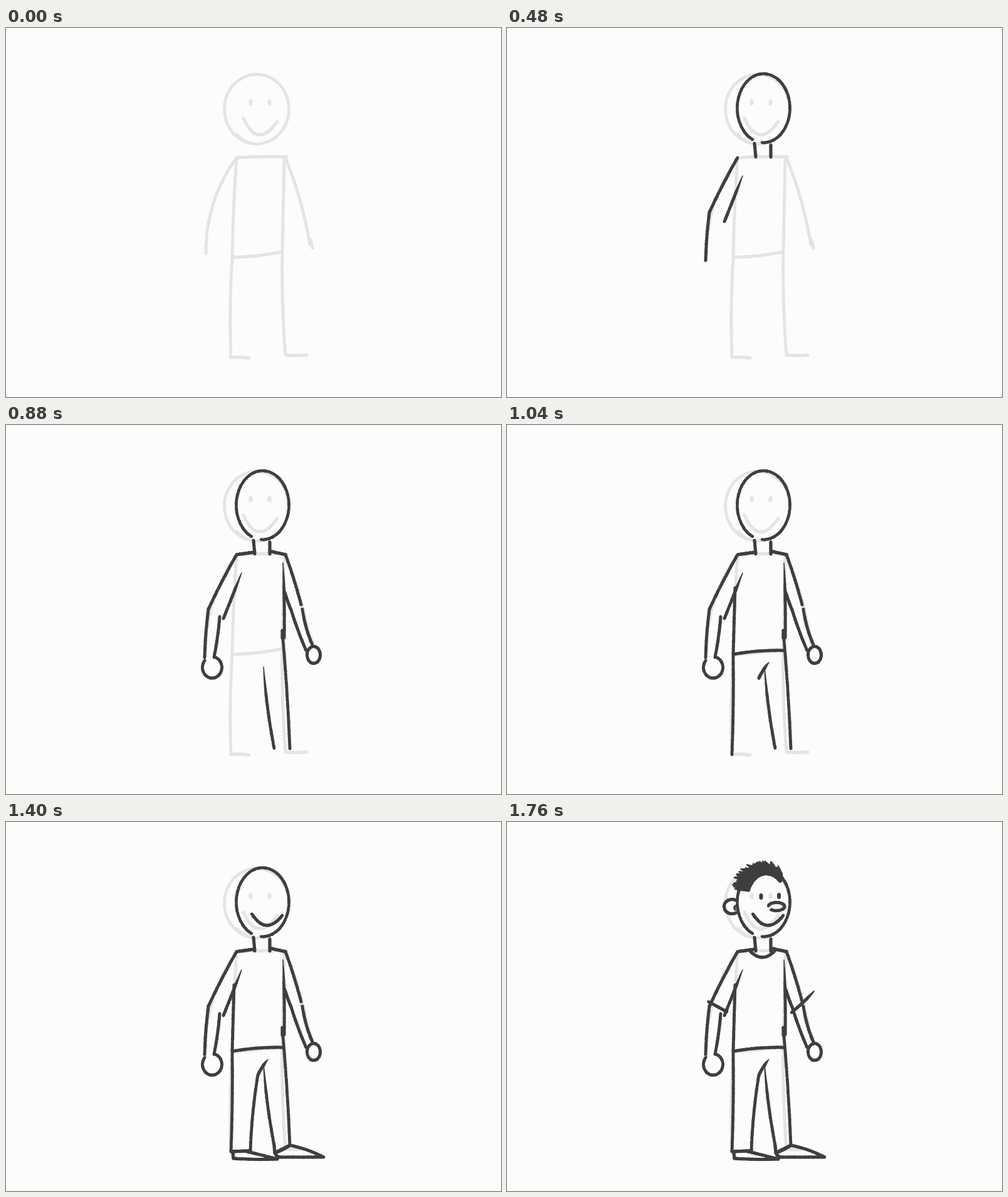
An HTML page with a canvas that plays this animation: 790 by 589 pixels, repeating every 2.76 s.

```html
<!DOCTYPE html>
<html lang="en">
<head>
<meta charset="utf-8">
<title>Sketching a figure</title>
<style>
html, body { margin: 0; width: 100%; height: 100%; overflow: hidden; background: #fcfcfc; }
canvas { display: block; }
</style>
</head>
<body>
<canvas id="stage" width="790" height="589"></canvas>
<script>
const ctx = document.getElementById('stage').getContext('2d');
const LOOP = 2760, START = 320, STEP = 40;
const PAPER = '#fcfcfc', PALE = '#e4e4e4', INK = '#3e3e3e';

let seed = 7;
const rnd = () => (seed = (seed * 16807) % 2147483647) / 2147483647;
const pt = (x, y) => ({ x, y });
const by = (p, dx, dy) => pt(p.x + dx, p.y + dy);
const mix = (a, b, u) => pt(a.x + (b.x - a.x) * u, a.y + (b.y - a.y) * u);

// A stroke has a path (u from 0 to 1 gives a point) and pen settings.
// A bow is a line from a to b that bulges sideways by `bulge` pixels.
function bow(a, b, bulge = 0, pen = {}) {
  const k = 2 * bulge / Math.hypot(b.x - a.x, b.y - a.y);
  const mid = by(mix(a, b, 0.5), (a.y - b.y) * k, (b.x - a.x) * k);
  return { at: u => mix(mix(a, mid, u), mix(mid, b, u), u), ...pen };
}

function onOval(c, rx, ry, degrees) {
  const t = degrees * Math.PI / 180;
  return by(c, rx * Math.cos(t), ry * Math.sin(t));
}

const oval = (c, rx, ry, from, to) => ({ at: u => onOval(c, rx, ry, from + (to - from) * u) });
const eye = (x, y) => bow(pt(x, y - 2), pt(x, y + 2), 0, { w: 5.6 });
const taper = { head: 0.3 };

const shoulderL = pt(368, 207), shoulderR = pt(446, 207);
const elbowL = pt(323, 294), elbowR = pt(455, 295);
const wristL = pt(317, 371), wristR = pt(489, 351);
const hipL = pt(361, 366), hipR = pt(441, 357);
const ankleL = pt(359, 526), ankleR = pt(446, 522);
const crotch = pt(402, 404), hem = pt(390, 525), hemR = pt(453, 516);
const toeL = pt(433, 538), toeR = pt(507, 535), heelL = pt(363, 537), heelR = pt(429, 528);

const guide = [
  oval(pt(400, 129.5), 51.5, 55.5, 100, 460),
  bow(pt(368, 170), pt(391, 184), 2),
  eye(390.5, 118.5), eye(420.5, 118.5),
  bow(pt(379, 144), pt(433, 149), 24),
  bow(shoulderL, by(shoulderR, 2, -1), -1),
  bow(shoulderL, hipL, 1), bow(by(shoulderR, -2, 0), hipR),
  bow(hipL, hipR, 2),
  bow(shoulderL, by(wristL, 2, -11), 13), bow(shoulderR, by(wristR, -4, -5), -4),
  bow(by(wristR, -3, -13), wristR),
  bow(hipL, ankleL, 2), bow(hipR, ankleR, 2),
  bow(ankleL, by(ankleL, 29, 1), -1), bow(ankleR, by(ankleR, 34, 0), 1)
];

// Each part lists its time steps in drawing order.
const headAndNeck = [
  [oval(pt(409.5, 128), 42, 55, 115, 453)],
  [bow(pt(395, 184), pt(397, 206)), bow(pt(421, 187), pt(421, 206))]
];

const arms = [
  [bow(shoulderL, elbowL, 1)],
  [bow(elbowL, wristL, 1)],
  [bow(pt(376, 236), pt(347, 309), 0, taper)],
  [bow(pt(341, 306), by(wristL, 15, 0), -1)],
  [oval(by(wristL, 12, 16), 15.5, 17, 222, -75)],
  [bow(shoulderL, pt(397, 203)), bow(pt(424, 202), shoulderR)],
  [bow(shoulderR, pt(471, 287), -1)],
  [bow(pt(473, 294), wristR, 2)],
  [bow(by(elbowR, -12, -37), elbowR, 1, taper), bow(elbowR, by(wristR, -10, 9), 1)],
  [oval(by(wristR, 2, 16), 10.5, 13.5, 260, -85)]
];

const bodyAndLegs = [
  [bow(pt(442, 220), pt(444, 340), -1, taper), bow(pt(441, 328), pt(441, 340))],
  [bow(by(hipR, 1, -15), hemR, -1)],
  [bow(pt(411, 386), by(heelR, -1, -12), 2, taper)],
  [bow(pt(364, 260), hipL)],
  [bow(hipL, by(hipR, 0, 3), -2)],
  [bow(hipL, ankleL, -1)],
  [bow(by(crotch, 16, -25), crotch, 1, taper)],
  [bow(crotch, hem, 2)],
  [bow(ankleL, hem)],
  [bow(by(heelR, -1, -12), heelR)],
  [bow(heelR, hemR, 1)]
];

const feet = [
  [bow(by(heelL, -1, -9), heelL), bow(heelL, toeL, 1)],
  [bow(by(hem, -5, 1), toeL)],
  [bow(heelR, hemR), bow(hemR, toeR, -2)],
  [bow(heelR, by(heelR, 7, 7), 1), bow(by(heelR, 7, 7), toeR)]
];

const face = [
  [bow(pt(392.5, 147), pt(441, 149), 17)],
  [oval(pt(430, 135), 13, 6.5, 190, 490)],
  [eye(405.5, 119), eye(434, 118)],
  [oval(pt(359, 135), 12.5, 11.5, 300, 60), bow(pt(368, 134), pt(364, 140), 3, { w: 3.5 })]
];

// Tufts fan out around the hairline, leaning back and to the left.
function hair(from, to) {
  const tufts = [];
  for (let a = from; a < to; a += 3) {
    const root = onOval(pt(414, 122), 31, 40, a + rnd() * 3);
    const tip = onOval(pt(408, 115), 50, 52, a - 6 - rnd() * 5);
    tufts.push(bow(root, mix(root, tip, 0.7 + rnd() * 0.4), 1, { w: 6.5, tail: 0.3 }));
  }
  return tufts;
}

const hairAndShirt = [
  hair(200, 236), hair(236, 272), hair(272, 316),
  [bow(pt(388, 206), pt(427, 206), 10)],
  [bow(pt(322, 287), pt(351, 303))],
  [bow(pt(454, 304), pt(490, 270), 1, { tail: 0.4 })]
];

const steps = [headAndNeck, arms, bodyAndLegs, feet, face, hairAndShirt].flat();

function drawStroke({ at, w = 4.9, head = 1, tail = 1 }, color) {
  const dots = 240;
  ctx.fillStyle = color;
  ctx.beginPath();
  for (let i = 0; i <= dots; i++) {
    const u = i / dots;
    const press = Math.min(1, head + u * 2, tail + (1 - u) * 2);
    const r = w / 2 * press * (0.91 + 0.14 * rnd());
    const { x, y } = by(at(u), (rnd() - 0.5) * 0.4, (rnd() - 0.5) * 0.4);
    ctx.moveTo(x + r, y);
    ctx.arc(x, y, r, 0, 7);
  }
  ctx.fill();
}

function draw(done) {
  seed = 7;
  ctx.fillStyle = PAPER;
  ctx.fillRect(0, 0, 790, 589);
  guide.forEach(s => drawStroke(s, PALE));
  steps.slice(0, done).flat().forEach(s => drawStroke(s, INK));
}

let shown = -1;
const begin = performance.now();
function tick() {
  const t = (performance.now() - begin) % LOOP;
  const done = t < START ? 0 : Math.min(steps.length, Math.floor((t - START) / STEP) + 1);
  if (done !== shown) draw(shown = done);
  requestAnimationFrame(tick);
}
tick();
</script>
</body>
</html>
```
